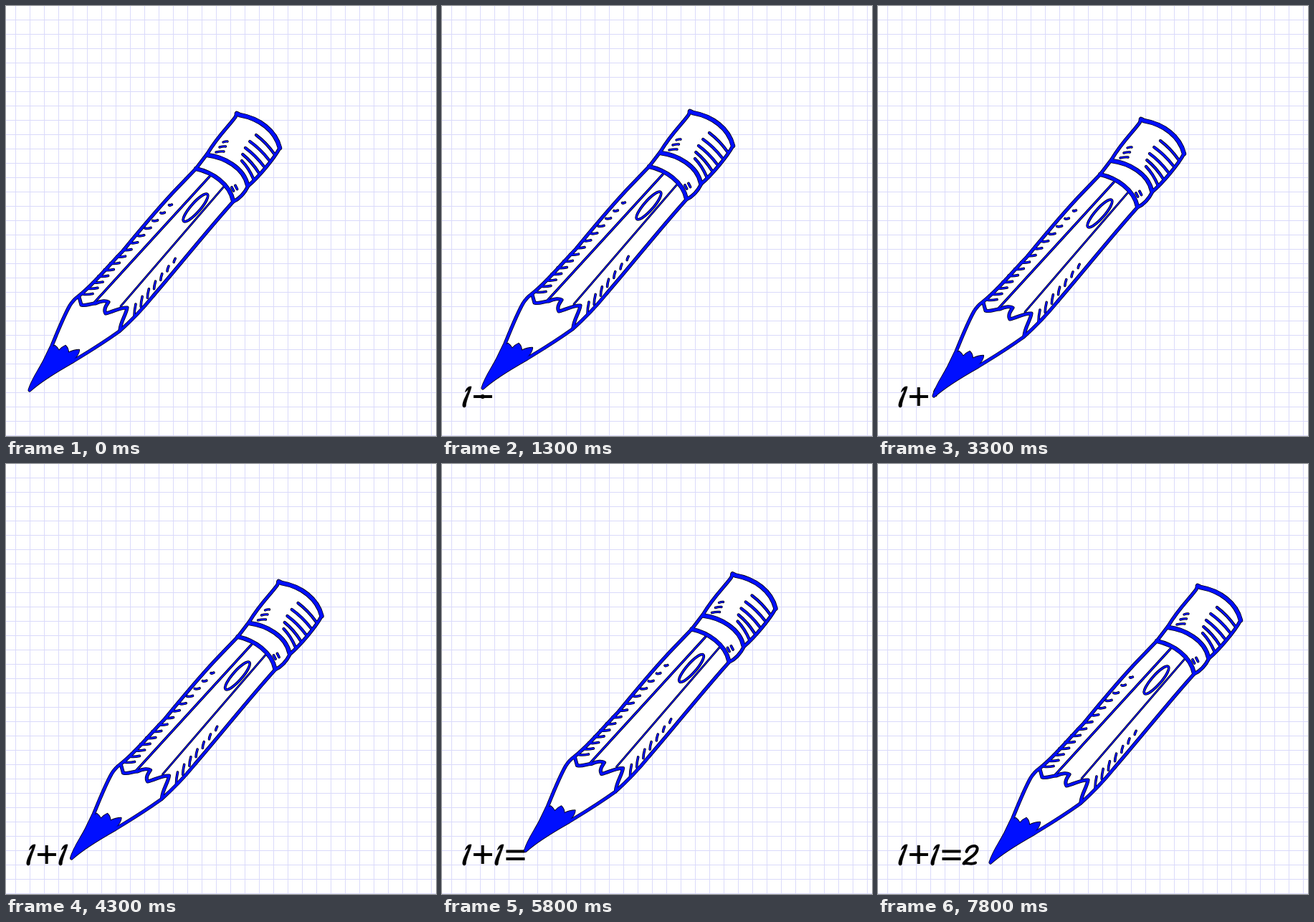
An HTML page with a canvas that plays this animation: 600 by 600 pixels, repeating every 8.3 s.

```html
<!DOCTYPE html>
<html lang="en">
<head>
<meta charset="utf-8">
<title>Pencil sum</title>
<style>
html, body { margin: 0; width: 100%; height: 100%; overflow: hidden; background: #fff; }
canvas { display: block; }
</style>
</head>
<body>
<canvas id="stage" width="600" height="600" role="img" aria-label="A pencil writes 1+1=2"></canvas>
<script>
const ctx = document.getElementById('stage').getContext('2d');
const LOOP = 8300;
const BLUE = '#000fff';
const INK = '#000';
const GRID = '#dadafa';
const path = d => new Path2D(d);

// Writing: each stroke has the pencil tips that make it and a way to draw it.
const onePath = path('M32.5 538C34 533 37 530.5 41 531C40 538 34 548 33 559C31 561 28 560 29 555' +
  'C30 549 36 540 37 535C35 536 34 538 32.5 538Z');
const twoPath = path('M123.5 541C125 535 131 532.6 135 533C141 534 139 541 133 546' +
  'C127 551 121 554 119.5 557.5C125 555.5 129 560 136 556.5');

const one = dx => ({
  tips: [[32 + dx, 537], [32 + dx, 545], [33.5 + dx, 560]],
  draw() {
    ctx.translate(dx, 0);
    ctx.lineWidth = 0.7;
    ctx.fill(onePath);
    ctx.stroke(onePath);
  }
});
const dash = (x, y) => ({
  tips: [[x + 1, y], [x + 26, y]],
  draw() { ctx.fillRect(x, y - 2, 26, 4); }
});
const upright = {
  tips: [[56, 534], [56, 550], [56, 560]],
  draw() { ctx.fillRect(54.7, 532, 4, 26); }
};
const two = {
  tips: [[122, 541], [129, 548], [133, 553]],
  draw() { ctx.lineWidth = 4; ctx.stroke(twoPath); }
};
const rest = { tips: [[156, 557]], draw() {} };

const strokes = [one(0), dash(44, 545), upright, one(45), dash(89.5, 551), dash(89.5, 540.5), two, rest];
const steps = strokes.flatMap(({ tips }, stroke) =>
  tips.map((tip, i) => ({ tip, stroke, first: i === 0, last: i === tips.length - 1 })));

// Three quick steps, then one every half second
const stepAt = t => steps[t < 300 ? Math.floor(t / 100) : 3 + Math.floor((t - 300) / 500)];

// The pencil is drawn with its tip at HOME.
const HOME = [32, 537];
const outline = path('M33 536C38 520 47 509 54 495L64 474C73 452 80 434 89 418Q94 410 101 405' +
  'C122 389 145 360 162 343C190 309 212 282 239 254L265 227L281 206C296 181 309 170 320 155' +
  'L322 150L326 152C354 157 376 174 382 198C374 213 353 238 338 251Q330 267 317 273' +
  'C280 314 243 361 205 405Q183 432 158 454C130 474 111 485 93 496C70 509 48 522 33 536Z');
const lead = path('M33 536C40 517 54 500 63 477L68 474Q71 476 74 481Q78 476 83 474' +
  'Q87 478 87 484Q95 480 102 480Q102 486 92 496C70 508 48 523 33 536Z');
const oval = new Path2D();
oval.ellipse(264.5, 281.5, 25, 6.5, -0.85, 0, Math.PI * 2);

const lines = [
  [3.6, outline],
  [5, path('M322 150L326 152C354 157 376 174 382 198')],
  [4.8, path('M281 208C305 211 332 226 337 250')],
  [4.8, path('M265 227C288 232 312 248 317 272')],
  [1.9, path('M284 238L123 414')],
  [1.3, path('M304 252L160 419')],
  [2.4, oval],
  [3.6, path('M102 406L105 417C112 419 118 415 125 415C133 411 140 411 143 413' +
    'C139 419 136 424 139 429C149 427 160 420 169 421C168 430 160 440 159 452')]
];

// Hatching: count, weight, sag, and a rule giving start and offset of mark i
function hatch(count, w, sag, rule) {
  for (let i = 0; i < count; i++) {
    const [x, y, dx, dy] = rule(i);
    lines.push([w, path(`M${x} ${y}q${dx / 2 - sag} ${dy / 2 + sag} ${dx} ${dy}`)]);
  }
}
hatch(14, 2.2, 1.5, i => [107 + 6.8 * i + 0.19 * i * i, 402 - 8 * i - 0.12 * i * i, 14 - 0.06 * i * i, -0.5]);
hatch(7, 2.1, 1, i => [179 + 9.2 * i, 432 - 12.4 * i, 2, 1.8 * i - 16]);
hatch(5, 2.8, -2, i => {
  const x = 329 + 1.25 * (4 - i) ** 2, y = 180 + 9 * i;
  return [x, y, 374 - 7.2 * i - x, 206 + 8.8 * i - y];
});
hatch(3, 1.9, -1, i => [293 + 5 * i, 204 - 7 * i, 11 - 2.5 * i, -1]);
hatch(2, 2.4, 0, i => [315 + 5 * i, 253 - 2.5 * i, 2.5, 5]);

function drawGrid() {
  ctx.fillStyle = '#fff';
  ctx.fillRect(0, 0, 600, 600);
  ctx.fillStyle = GRID;
  for (let i = 0; i < 600; i += 20) {
    ctx.fillRect(i + 13, 0, 1, 600);
    ctx.fillRect(0, i + 19, 600, 1);
  }
}

function drawSum({ tip, stroke, first, last }) {
  ctx.fillStyle = ctx.strokeStyle = INK;
  strokes.slice(0, stroke + 1).forEach((s, i) => {
    const current = i === stroke;
    if (current && first) return;
    ctx.save();
    if (current && !last) {
      ctx.beginPath();
      ctx.rect(0, 0, 600, tip[1]);
      ctx.clip();
    }
    s.draw();
    ctx.restore();
  });
  // Ink dot where the plus crosses
  if (stroke >= strokes.indexOf(upright)) {
    ctx.beginPath();
    ctx.arc(56.7, 545, 3, 0, Math.PI * 2);
    ctx.fill();
  }
}

function drawPencil([x, y]) {
  ctx.save();
  ctx.translate(x - HOME[0], y - HOME[1]);
  ctx.fillStyle = '#fff';
  ctx.fill(outline);
  for (const [color, extra] of [[INK, 1.5], [BLUE, 0]]) {
    ctx.strokeStyle = ctx.fillStyle = color;
    for (const [w, p] of lines) {
      ctx.lineWidth = w + extra;
      ctx.stroke(p);
    }
    ctx.lineWidth = 0.8 + extra;
    ctx.stroke(lead);
    ctx.fill(lead);
  }
  ctx.restore();
}

ctx.lineCap = ctx.lineJoin = 'round';
let shown = null;

function render() {
  const step = stepAt(performance.now() % LOOP);
  if (step !== shown) {
    shown = step;
    drawGrid();
    drawSum(step);
    drawPencil(step.tip);
  }
  requestAnimationFrame(render);
}
render();
</script>
</body>
</html>
```
